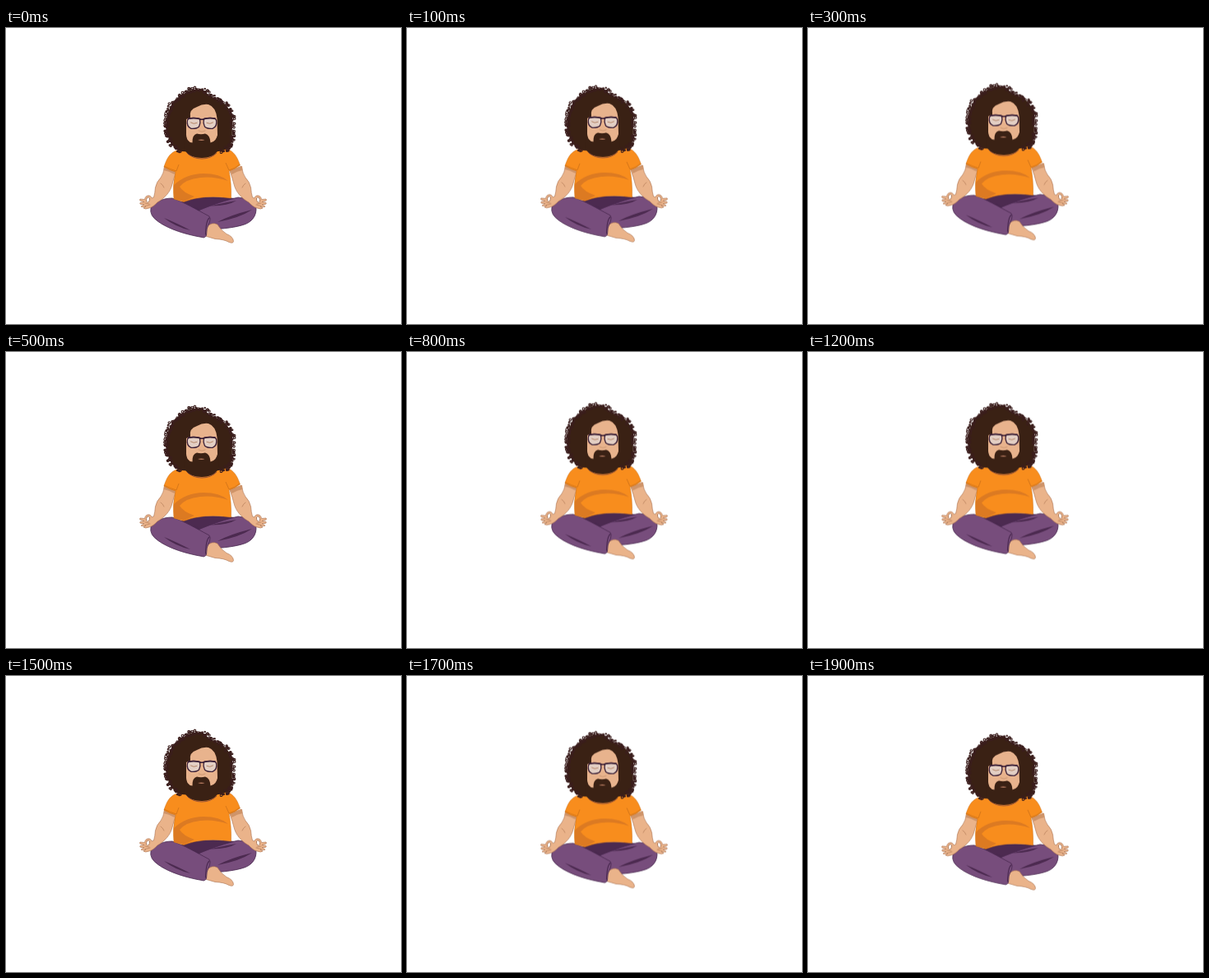
An HTML page that plays this animation: 480 px wide and 360 px high, repeating every 2 s.

```html
<!DOCTYPE html>
<html lang="en">
<head>
<meta charset="utf-8">
<title>Levitating meditation</title>
<style>
  html, body { margin: 0; width: 100%; height: 100%; overflow: hidden; background: #fff; }
  svg { display: block; width: 100vw; height: 100vh; }
  #man { animation: float 2s steps(10, end) infinite; }
  @keyframes float {
    0%, 100% { transform: translateY(0); }
    50% { transform: translateY(-12px); }
  }
  .skin { fill: #eab38a; stroke: #a9714f; stroke-width: .6; }
  .face { fill: #e8b38d; }
  .pants { fill: #774d7c; stroke: #4a2950; stroke-width: .8; }
  .shade { fill: #4c2a50; }
  .fold { fill: none; stroke: #4a2950; stroke-width: 1.1; stroke-linecap: round; }
  .shirt { fill: #f88d1d; stroke: #c96f18; stroke-width: .5; }
  .seam { fill: none; stroke: #d77719; stroke-width: 1; }
  .hair { fill: #3a2114; }
  .line { fill: none; stroke: #a9714f; stroke-width: .8; stroke-linecap: round; }
</style>
</head>
<body>
<svg viewBox="0 0 480 360">
  <defs>
    <g id="arm">
      <path class="skin" d="M193 168 Q191 178 188 182 Q183 187 181.500 194 Q181 201 179.500 206 L177 207 C176 202 169 203 168.500 208.500 L163 208 Q161.500 209.500 164 210.500 L168 211.500 L163 212.500 Q162 214 164 214.500 L168 214.500 L164 217 Q164.500 218.500 170 217 L167 219 Q169 221 174 219 C178 218 181 215 184 212 C193 207 200 199 202 190 Q204 182 207 174 Z"/>
      <ellipse cx="172.500" cy="209" rx="2" ry="3.200" fill="#fff" stroke="#a9714f" stroke-width=".8" transform="rotate(12 172.500 209)"/>
      <path d="M192 168 L207 173 L204.500 178 Q198 174 191.500 173 Z" fill="#cf9469"/>
      <path class="line" d="M169 213 L174 214 M169 216.500 L175 215 M188 189 Q191 191 192 194" opacity=".7"/>
    </g>
  </defs>
  <g id="man">
    <path class="shade" d="M213 211 Q239 202 278 207 L272 220 L238 231 Z"/>
    <path class="pants" d="M234 222 C250 215 269 209 282 206 Q296 207 303 214 C306 224 302 234 291 238.500 C280 242.500 264 244.500 246 245 L239 235 Z"/>
    <path class="shade" d="M234 221 Q254 214 280 210 Q270 216 250 216.500 Q242 217 234 221Z"/>
    <path class="shade" d="M257 236 Q271 228 299 221 Q284 231 257 236Z"/>

    <path class="skin" d="M243 243 Q250 235 257 239 Q261 246 268 250.500 Q276 253.500 276.500 259.500 Q276 262.500 271 260.500 Q265 257 254 256.500 L242 253 Z"/>
    <path class="pants" d="M176 219 C181 211 191 207 202 207 C217 212 230 220 247 229 Q249 231 247.500 236 Q243 244 243.500 252 Q242 256 238 254.500 C220 251.500 198 245 185 235.500 Q174 228 176 219 Z"/>
    <path class="shade" d="M192 231 Q207 237 224 246 Q206 242 192 231Z"/>
    <path class="fold" d="M247 231 Q243 234 242.500 251 M229 217.500 L234 221"/>

    <use href="#arm"/>
    <use href="#arm" transform="matrix(-1 0 0 1 479 0)"/>
    <path class="shirt" d="M206 149.500 Q215 146 238 147 Q263 145 271 148 C279 152 282 160 284.500 167 Q278 172 271 174 Q274 188 273.500 207 Q240 202 216 211.500 L204 208 Q202 192 206 175 Q198 173 192 169 C195 160 198 153 206 149.500 Z"/>
    <path d="M204 191 Q219 177 240 177 Q260 177 270 186 Q252 180 236 182 Q218 184 211 193 Q215 200 229 205 L216 211 L204 207.500 Z" fill="#dc7a22"/>
    <path class="seam" d="M192 168 Q200 172 207 174 L210 166 M284 166 Q278 171 271 173 L267 164"/>

    <path id="mane" class="hair" d="M217 80 C224 74 234 73 242 77 C247 84 255 85 263 90 C272 97 277 107 275 117 C274 126 277 137 271 146 Q261 151 252 150 L221 150 Q207 152 202 142 C196 135 194 122 195 111 C197 98 204 85 217 80 Z"/>
    <path id="curls" fill="none" stroke="#3a1d1c" stroke-width="1.100"/>
    <path class="face" d="M219 111 L224 109 Q222 99 232 96 Q239 92 246 93 Q255 96 256.500 110 L257 130 Q255 147 238 148 Q220 146 219 130 Z"/>
    <path class="hair" d="M218 127 Q219 139 226.500 139.500 Q226 130 232 128.500 Q237 130 242 128.500 Q248 130 248.500 139.500 Q256 138 258 127 Q260 142 257 150 Q251 158 238 158 Q224 158 218 150 Q216 139 218 127 Z"/>
    <path d="M220 152 Q227 159 238 159 Q249 159 256 152" fill="none" stroke="#6d3a45" stroke-width=".7"/>
    <path d="M233 136 Q237 135 241.500 136 Q238 137.800 233 136Z" fill="#b67b61"/>
    <path class="line" d="M234 125 Q238 127.500 242 125" opacity=".5"/>
    <g fill="#e3cfc4" stroke="#3a1f36" stroke-width="1.300">
      <path id="lens" d="M222 110 Q228 108.700 235 110.200 Q237 114 234.500 120 Q232 122.700 225 122.300 Q219 120 220.500 112 Z"/>
      <use href="#lens" transform="matrix(-1 0 0 1 476 0)"/>
      <path d="M221 110.500 Q228 108.700 235 110.500 Q238 112 241 110.500 Q248 108.700 255 110.500" fill="none" stroke-width="1.600"/>
    </g>
    <path class="line" d="M224.500 115 Q228 117.500 232 115.500 M244 115.500 Q248 117.500 251.500 115"/>
  </g>
</svg>
<script>
  // Ring the mane with small seeded curls.
  const mane = document.getElementById('mane');
  let seed = 17;
  const random = () => (seed = seed * 16807 % 2147483647) / 2147483647;
  const spread = size => (random() - .5) * size;
  const ring = (x, y, r) => `M${x - r} ${y}a${r} ${r} 0 1 0 ${2 * r} 0a${r} ${r} 0 1 0 ${-2 * r} 0`;
  const length = mane.getTotalLength();
  const count = 280;
  let curls = '';
  for (let i = 0; i < count; i++) {
    const p = mane.getPointAtLength(length * i / count);
    if (p.y > 143 && p.x > 212 && p.x < 262) continue;
    curls += ring(p.x + spread(5), p.y + spread(5), .6 + random() * .9);
  }
  document.getElementById('curls').setAttribute('d', curls);
</script>
</body>
</html>
```
